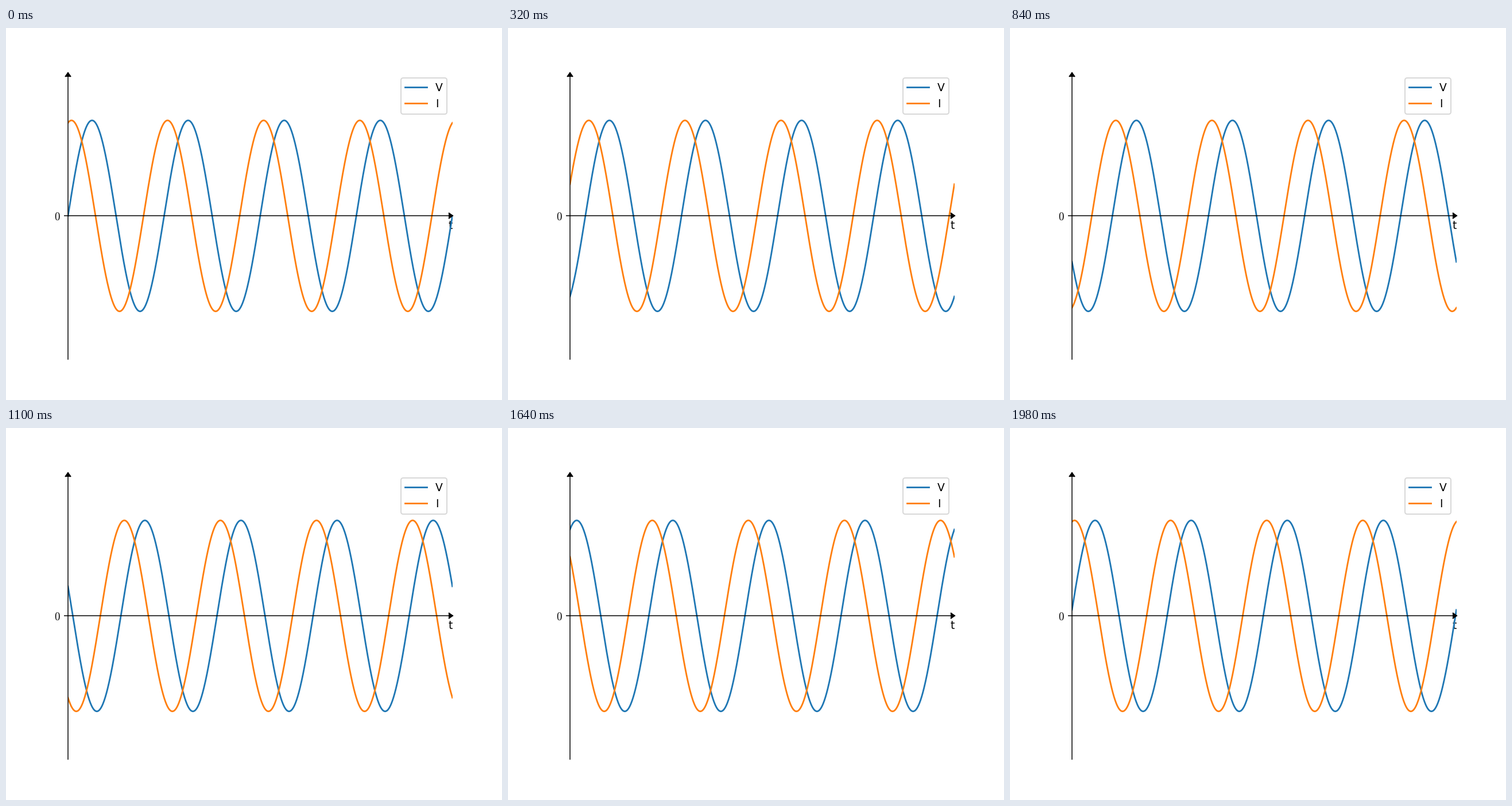
Write a matplotlib script that moves like this. It is 864 px wide and 648 px high and loops after 2000 ms.

```python
import numpy as np
import matplotlib.pyplot as plt
from matplotlib.animation import FuncAnimation
from matplotlib.markers import CARETRIGHT, CARETUP

FRAMES = 100
CYCLES = 4
LEAD = np.radians(77)  # current leads voltage

plt.rcParams["mathtext.fontset"] = "cm"
plt.rcParams["font.family"] = "DejaVu Sans"

fig, ax = plt.subplots(figsize=(6.4, 4.8), dpi=135)
x = np.linspace(0, 1, 1000)
angle = 2 * np.pi * CYCLES * x

volt, = ax.plot(x, np.sin(angle), color="#1f77b4", label="V")
curr, = ax.plot(x, np.sin(angle + LEAD), color="#ff7f0e", label="I")

ax.set_xlim(0, 1)
ax.set_ylim(-1.5, 1.5)
ax.set_xticks([])
ax.set_yticks([0], ["$0$"])
ax.set_xlabel("t", loc="right")
ax.spines[["top", "right"]].set_visible(False)
ax.spines["bottom"].set_position(("data", 0))


def arrow(px, py, marker, transform):
    ax.plot([px], [py], ls="", marker=marker, ms=5, color="k",
            transform=transform, clip_on=False)


arrow(1, 0, CARETRIGHT, ax.get_yaxis_transform())
arrow(0, 1, CARETUP, ax.get_xaxis_transform())
ax.legend(loc="upper right")


def update(i):
    phase = angle - 2 * np.pi * i / FRAMES
    volt.set_ydata(np.sin(phase))
    curr.set_ydata(np.sin(phase + LEAD))
    return volt, curr


anim = FuncAnimation(fig, update, frames=FRAMES, interval=20,
                     repeat=True, repeat_delay=0)
plt.show()
```
